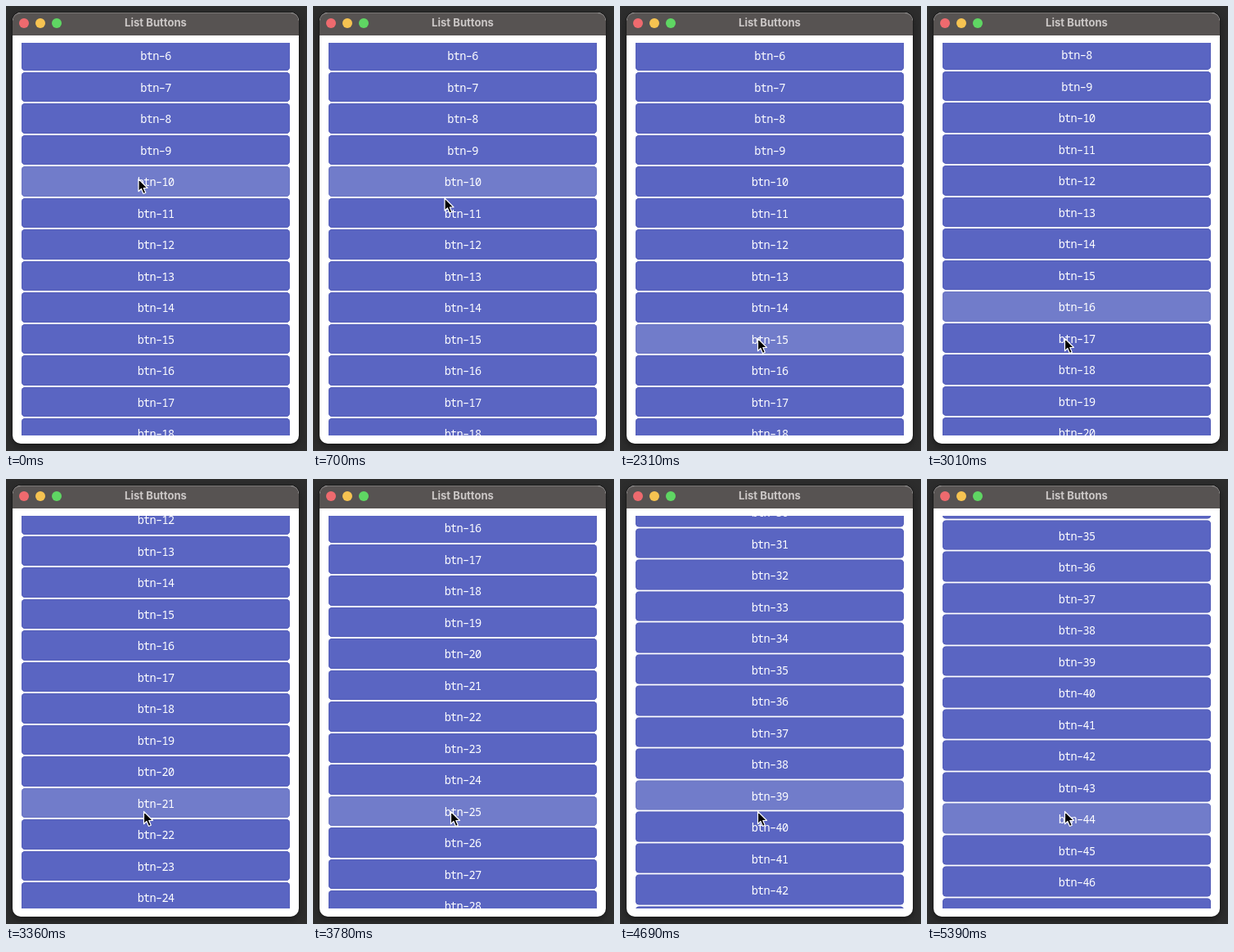
An HTML page that plays this animation: 368x544 px, repeating every 5.46 s.

```html
<!DOCTYPE html>
<html lang="en">
<head>
<meta charset="utf-8">
<title>List Buttons</title>
<style>
  html, body { margin: 0; width: 100%; height: 100%; overflow: hidden; background: #2d2d2d; }
  #stage { position: relative; width: 368px; height: 544px; overflow: hidden; background: #2d2d2d; }
  #window {
    position: absolute; left: 8px; top: 8px; width: 350px; height: 527px;
    border-radius: 10px; overflow: hidden; background: #fff;
    box-shadow: 0 0 0 1px #1d1d1d, 0 3px 8px #1a1a1a;
  }
  #bar {
    height: 28px; box-sizing: border-box; background: #575352;
    border-top: 1px solid #7b7877;
    border-radius: 10px 10px 0 0;
    font: 700 13.1px/23px Inter, sans-serif; color: #cbc7c6; text-align: center;
  }
  #bar i { position: absolute; top: 6.5px; width: 12px; height: 12px; border-radius: 50%; }
  #list { position: absolute; left: 11px; top: 37px; width: 328px; height: 480px; overflow: hidden; }
  #rows { position: absolute; left: 0; top: -3px; width: 100%; }
  .btn {
    position: absolute; width: 100%; height: 36.5px; border-radius: 4.5px;
    background: #5a65c2; color: #fff; text-align: center;
    box-shadow: inset 0 0 0 1px #545eb8;
    font: 500 13.6px/37.5px "Noto Sans Mono", monospace; letter-spacing: -.7px;
  }
  .btn.hover { background: #717cca; box-shadow: inset 0 0 0 1px #6a74c2; }
  #cursor { position: absolute; left: 0; top: 0; overflow: visible; }
</style>
</head>
<body>
<div id="stage">
  <div id="window">
    <div id="bar">
      <i style="left:8px;background:#ee6a6e"></i>
      <i style="left:28px;background:#f6c351"></i>
      <i style="left:48px;background:#5fd663"></i>
      List Buttons
    </div>
    <div id="list"><div id="rows"></div></div>
  </div>
  <svg id="cursor" width="14" height="20">
    <path d="M0 0V15.2L3.4 12L6 18L8.8 16.8L6.3 11H11Z" fill="#000" stroke="#fff" stroke-width="1.2" stroke-linejoin="round"/>
  </svg>
</div>
<script>
  const LOOP = 5460, STEP = 70;
  const FIRST = 6, LAST = 48, PITCH = 38.5, HEIGHT = 36.5, TOP = 42;

  // [time, value] keys
  const scrollKeys = [
    [2590, 0], [2940, 56], [3290, 213], [3360, 242], [3570, 332], [3710, 374],
    [3780, 386], [4060, 412], [4130, 412], [4200, 428], [4410, 770],
    [4690, 944.5], [4900, 1026], [5180, 1096], [5390, 1108.5]
  ];
  const xKeys = [[0, 162], [700, 161], [2170, 168.5]];
  const yKeys = [[0, 211.5], [420, 219], [630, 231], [700, 235], [1400, 322], [2170, 406.5]];

  // Monotone cubic interpolation
  function sample(keys, t) {
    const end = keys.length - 1;
    if (t <= keys[0][0]) return keys[0][1];
    if (t >= keys[end][0]) return keys[end][1];
    const slope = i => (keys[i + 1][1] - keys[i][1]) / (keys[i + 1][0] - keys[i][0]);
    const tangent = i => {
      if (i === 0 || i === end) return 0;
      const a = slope(i - 1), b = slope(i);
      return a * b <= 0 ? 0 : 2 * a * b / (a + b);
    };
    let i = 0;
    while (t >= keys[i + 1][0]) i++;
    const [t0, v0] = keys[i], [t1, v1] = keys[i + 1];
    const d = t1 - t0, u = (t - t0) / d, w = 1 - u;
    return v0 * (1 + 2 * u) * w * w + tangent(i) * d * u * w * w
         + v1 * u * u * (3 - 2 * u) - tangent(i + 1) * d * u * u * w;
  }

  const rows = document.getElementById("rows");
  const cursor = document.getElementById("cursor");
  const buttons = [];
  for (let n = FIRST; n <= LAST; n++) {
    const b = document.createElement("div");
    b.className = "btn";
    b.textContent = "btn–" + n;
    b.style.top = (n - FIRST) * PITCH + "px";
    rows.append(b);
    buttons.push(b);
  }

  function rowUnderPointer(t) {
    const y = sample(yKeys, t) - TOP + sample(scrollKeys, t);
    return y % PITCH <= HEIGHT ? Math.floor(y / PITCH) : -1;
  }

  function draw(time) {
    const t = Math.floor((time % LOOP) / STEP) * STEP;
    rows.style.transform = `translateY(${-sample(scrollKeys, t)}px)`;
    cursor.style.transform = `translate(${sample(xKeys, t)}px, ${sample(yKeys, t)}px)`;
    // The highlight trails the pointer by one step
    const hot = rowUnderPointer(t - STEP);
    buttons.forEach((b, i) => b.classList.toggle("hover", i === hot));
  }

  const start = performance.now();
  function tick() {
    draw(performance.now() - start);
    requestAnimationFrame(tick);
  }
  tick();
</script>
</body>
</html>
```
